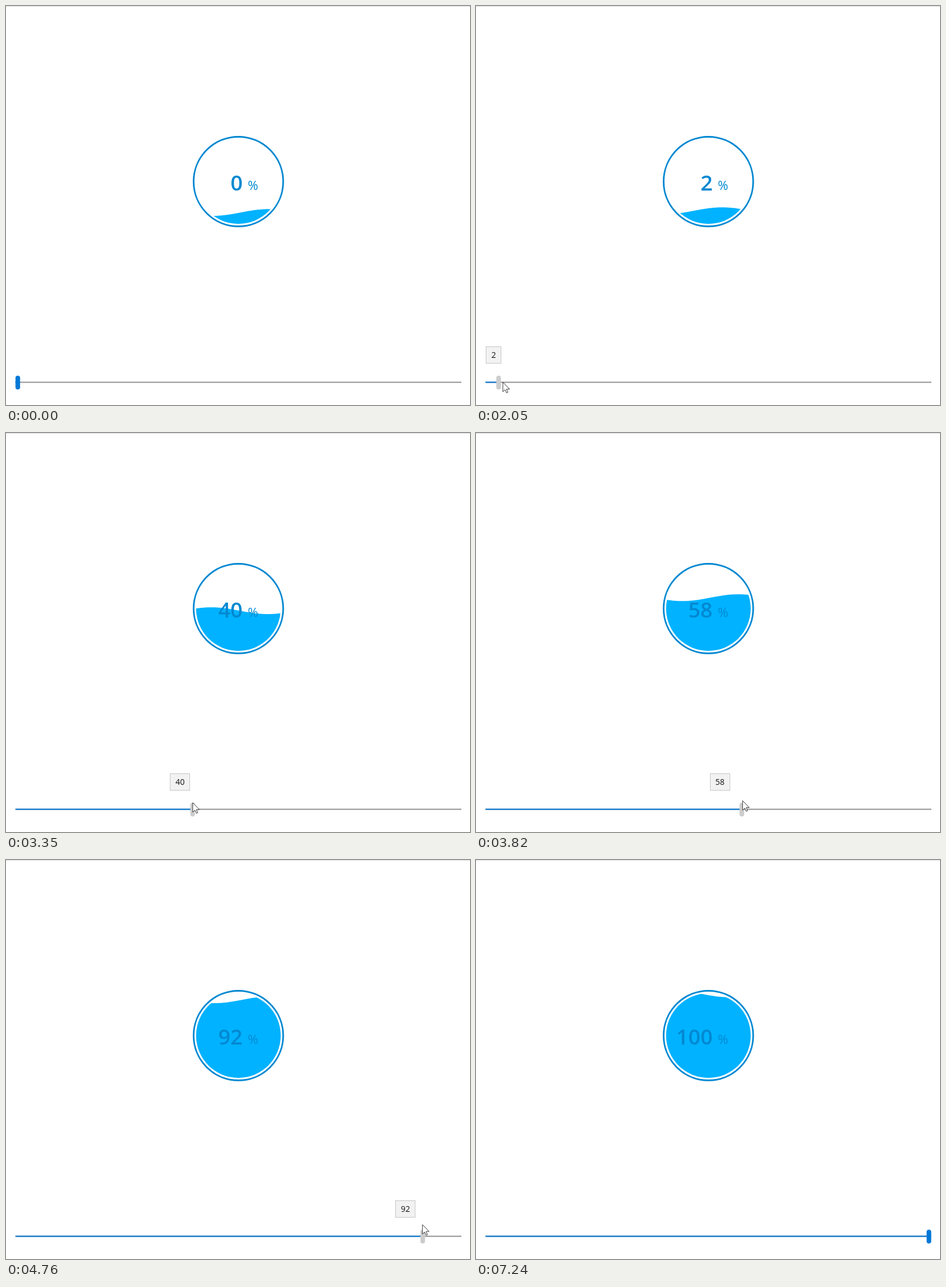
Animation, 807 px wide and 694 px high, one loop 7280 ms. Source, as an HTML page:

```html
<!DOCTYPE html>
<html lang="en">
<head>
<meta charset="utf-8">
<title>Wave progress</title>
<style>
  html, body { margin: 0; width: 100%; height: 100%; overflow: hidden; background: #fff; }
  svg { display: block; width: 807px; height: 694px; font-family: "Open Sans", "Noto Sans", sans-serif; }
  .ink { fill: #0288d1; }
  #value { font-size: 37px; font-weight: 600; text-anchor: end; }
  #unit { font-size: 22px; }
  #tipBox { fill: #f2f2f2; stroke: #c6c6c6; }
  #tipText { font-size: 14px; text-anchor: middle; fill: #111; }
  #thumb { fill: #0078d7; }
  #track { fill: #919191; }
  .hover #thumb { fill: #171717; }
  .hover #track { fill: #606060; }
  .press #thumb { fill: #ccc; }
</style>
</head>
<body>
<svg id="stage" viewBox="0 0 807 694">
  <clipPath id="bowl"><circle cx="404.2" cy="305.4" r="73.6"/></clipPath>
  <rect width="807" height="1" fill="#d9d9d9"/>
  <circle cx="404.2" cy="305.4" r="77.9" fill="none" stroke="#0288d1" stroke-width="2.9"/>
  <g clip-path="url(#bowl)"><path id="water" fill="#00b2ff"/></g>
  <text id="value" class="ink" x="411.5" y="320.7"></text>
  <text id="unit" class="ink" x="420.6" y="320.2">%</text>

  <rect id="track" x="16.5" y="653.5" width="775.5" height="2"/>
  <rect id="fill" x="16.5" y="653.5" height="2" fill="#0078d7"/>
  <rect id="thumb" y="643" width="8" height="24" rx="4"/>
  <g id="tip">
    <rect id="tipBox" y="592.5" height="29"/>
    <text id="tipText" y="612.2"></text>
  </g>
  <path id="cursor" d="M0 0V16.5L3.8 13L6.3 18.5L8.7 17.5L6.3 12H11.6Z" fill="#fff" stroke="#222" stroke-width=".9"/>
</svg>
<script>
const LOOP = 7280;
const WAVE = { length: 196, period: 955, height: 5.9, trough: 359 };
const PRESS = 1720, RELEASE = 5290, TIP_END = 5520;

// [time, value]
const drag = [[1720, 0.4], [2000, 1.8], [2220, 4.6], [2610, 12], [2950, 23],
              [3350, 39.6], [4240, 73.6], [4490, 82.5], [5000, 100]];
// [time, x, y]
const pointer = [[980, 40, 694], [1280, 26.8, 661], [1720, 26.8, 661], [2220, 57, 651],
                 [2610, 113, 646.5], [3350, 324.5, 643], [4240, 587.5, 636.5], [5000, 787, 633]];

const $ = id => document.getElementById(id);
const el = {};
for (const id of ["stage", "water", "value", "fill", "thumb", "tip", "tipBox", "tipText", "cursor"]) el[id] = $(id);
const show = (node, on) => node.setAttribute("visibility", on ? "visible" : "hidden");

function track(keys, t, col = 1) {
  if (t <= keys[0][0]) return keys[0][col];
  for (let i = 1; i < keys.length; i++) {
    const a = keys[i - 1], b = keys[i];
    if (t < b[0]) return a[col] + (b[col] - a[col]) * (t - a[0]) / (b[0] - a[0]);
  }
  return keys[keys.length - 1][col];
}

const valueAt = t => t < PRESS ? 0 : track(drag, t);
const thumbX = v => 20.5 + 7.672 * v;

function waterPath(t, v) {
  const level = 359.2 - 1.264 * v;
  const trough = WAVE.trough - WAVE.length * t / WAVE.period;
  let d = "M328 390";
  for (let x = 328; x <= 482; x += 2) {
    const y = level + WAVE.height * Math.cos(2 * Math.PI * (x - trough) / WAVE.length);
    d += `L${x} ${y.toFixed(2)}`;
  }
  return d + "V390Z";
}

// The tooltip catches up with the thumb at regular intervals.
function drawTip(t, label) {
  const step = 136.5;
  const lag = (((t - 4239) % step) + step) % step;
  const x = thumbX(valueAt(Math.max(PRESS, t - lag)));
  const width = 18.5 + 8 * label.length;
  el.tipBox.setAttribute("x", Math.round(x - width / 2 - 0.5) + 0.5);
  el.tipBox.setAttribute("width", Math.round(width - 0.5));
  el.tipText.setAttribute("x", x - 0.5);
  el.tipText.textContent = label;
}

function render(t) {
  const v = valueAt(t), label = String(Math.round(v)), x = thumbX(v);
  const pressed = t >= PRESS && t < RELEASE;
  const hovered = t >= 1200 && t < PRESS;
  el.stage.setAttribute("class", pressed ? "press" : hovered ? "hover" : "");
  el.water.setAttribute("d", waterPath(t, v));
  el.value.textContent = label;
  el.thumb.setAttribute("x", x - 4);
  el.fill.setAttribute("width", x - 16.5);

  const tipOn = t >= PRESS && t < TIP_END;
  show(el.tip, tipOn);
  if (tipOn) drawTip(t, label);

  show(el.cursor, t >= pointer[0][0] && t < RELEASE);
  el.cursor.setAttribute("transform", `translate(${track(pointer, t)} ${track(pointer, t, 2)})`);
}

const start = performance.now();
function frame() {
  render((performance.now() - start) % LOOP);
  requestAnimationFrame(frame);
}
frame();
</script>
</body>
</html>
```
